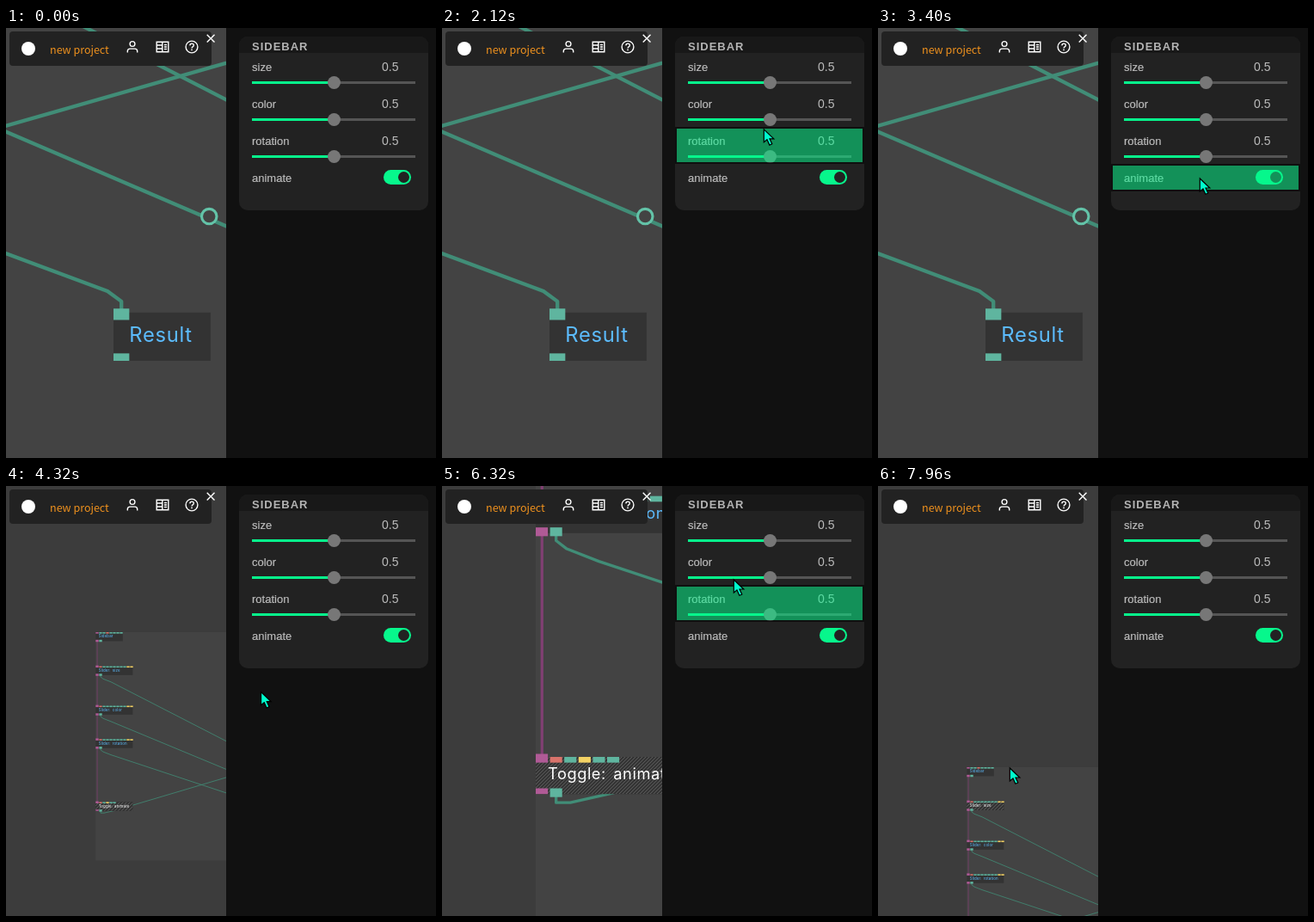
These frames come from a looping animation (500 by 500 pixels, 8 s). An HTML page with a canvas:

```html
<!DOCTYPE html>
<html lang="en">
<head>
<meta charset="utf-8">
<title>Patch editor with sidebar</title>
<style>
  html, body { margin: 0; width: 100%; height: 100%; overflow: hidden; background: #111; }
  #stage { position: relative; width: 500px; height: 500px; overflow: hidden; background: #111; }
  #stage * { position: absolute; }
  #patch { left: 0; top: 0; width: 256px; height: 500px; }
  #bar { left: 4px; top: 4px; width: 235px; height: 40px; border-radius: 4px; background: #222; }
  #icons, #cursor { left: 0; top: 0; overflow: visible; }
  #project { left: 51px; top: 15px; font: 12.5px/20px "Noto Sans CJK JP", "Noto Sans CJK", "Open Sans", sans-serif; color: #f0921e; white-space: nowrap; }
  #panel { left: 271px; top: 10px; width: 220px; height: 202px; border-radius: 10px; background: #222; overflow: hidden; }
  #head { left: 0; top: 0; width: 220px; height: 19px; background: #181818; }
  #head b { left: 15px; top: 4px; font: bold 13px/16px "Liberation Sans", Arial, sans-serif; letter-spacing: 1px; color: #b4b4b4; }
  .row { left: 2px; width: 216px; height: 39px; }
  .row span { left: 13px; top: 7px; font: 13px/15px "Liberation Sans", Arial, sans-serif; color: #bbb; -webkit-text-stroke: .2px; }
  .row .value { left: 164px; top: 6px; font-size: 14px; line-height: 16px; -webkit-text-stroke: 0; }
  .track, .fill { left: 13px; top: 31px; width: 190px; height: 3px; background: #555; }
  .fill { width: 95px; background: #07f78c; }
  .knob { left: 101px; top: 25px; width: 15px; height: 15px; border-radius: 50%; background: #777; }
  .row:last-child { height: 28px; }
  .switch { left: 166px; top: 5px; width: 32px; height: 17px; border-radius: 9px; background: #07f78c; }
  .switch i { right: 2px; top: 2px; width: 13px; height: 13px; border-radius: 50%; background: #222; }
  .row.on::after { content: ""; position: absolute; inset: 0; background: rgba(7, 247, 140, .52); box-shadow: 0 0 0 2px rgba(0, 0, 0, .55); }
</style>
</head>
<body>
<div id="stage">
  <canvas id="patch"></canvas>
  <div id="bar"></div>
  <div id="project">new project</div>
  <svg id="icons" width="256" height="50" fill="none" stroke="#fff" stroke-width="1.4">
    <circle cx="26" cy="24" r="8" fill="#fff" stroke="none"/>
    <circle cx="147" cy="18.5" r="2.9"/>
    <path d="M141.3 28.5v-1.4q0-3 3-3h5.4q3 0 3 3v1.4"/>
    <path d="M175.2 16.2h13.6v11.6h-13.6zM181.8 16v12M184 19.5h3M184 22h3M184 24.5h3M175 20h6.5M175 24h6.5"/>
    <circle cx="216" cy="22" r="6.9"/>
    <path d="M213.8 20.4q.1-2.3 2.3-2.3 2.2 0 2.2 2 0 1.2-1.2 1.8-1 .6-1 1.5M216 24.6v1.6"/>
    <path d="M233.7 7.7l8.8 8.8m0-8.8l-8.8 8.8"/>
  </svg>
  <div id="panel"><div id="head"><b>SIDEBAR</b></div></div>
  <svg id="cursor" width="14" height="21">
    <path d="M.3 0V15L4 12 6.800 18.300 9.800 17 7 11H11.800Z" fill="#0fc" stroke="#000" stroke-width="1.200"/>
  </svg>
</div>
<script>
const LOOP = 8000, APPEAR = 680, HOVER = 1720, CLICK_TOGGLE = 3800, CLICK_SIZE = 7200;
const HOVER_LAG = 40;
const COLORS = { t: '#5fb59f', p: '#b05a96', r: '#d9736b', y: '#f3d264' };
const $ = id => document.getElementById(id);

const panel = $('panel'), cursor = $('cursor');
const sliderUi = '<span class="value">0.5</span><div class="track"></div><div class="fill"></div><div class="knob"></div>';
const switchUi = '<div class="switch"><i></i></div>';
const rows = ['size', 'color', 'rotation', 'animate'].map((name, i) => {
  const row = document.createElement('div');
  row.className = 'row';
  row.style.top = 21 + 43 * i + 'px';
  row.innerHTML = `<span>${name}</span>` + (name === 'animate' ? switchUi : sliderUi);
  panel.append(row);
  return row;
});

// Moves: start, end, then the values reached
const pointerMoves = [
  [680, 1280, 374, 157], [1920, 2320, 374, 79], [2480, 2640, 380, 55], [2835, 3300, 374, 175],
  [3800, 4320, 296, 239], [4320, 4560, 354, 399], [4640, 5400, 144, 324],
  [5520, 6320, 339, 109], [6360, 6600, 346, 55], [7240, 7960, 153, 328]
];
const viewMoves = [
  [3800, 4200, 1, 104.3, 170], [4900, 5400, 4.03, 109, -480.5],
  [5520, 5800, 4.15, 109, -504.2], [7200, 7600, 1, 103.3, 327]
];
const linear = u => u;
const smooth = u => u * u * (3 - 2 * u);

function follow(start, moves, t, ease) {
  return moves.reduce((from, [t0, t1, ...to]) => {
    const u = ease(Math.min(1, Math.max(0, (t - t0) / (t1 - t0))));
    return from.map((v, i) => v + (to[i] - v) * u);
  }, start);
}
const pointerAt = t => follow([464, 459], pointerMoves, t, linear);
const viewAt = t => follow([5.4, -901, -774], viewMoves, t, smooth);

// The highlight trails the pointer slightly
function hoveredRow(t) {
  if (t < HOVER || t >= CLICK_SIZE || (t >= CLICK_TOGGLE && t < 5520)) return -1;
  const [x, y] = pointerAt(t - HOVER_LAG);
  return x > 271 && y < 190 ? Math.floor((y - 29) / 43) : -1;
}

// Nodes and cables in patch units
const HEIGHT = 10.4, PITCH = 4;
const node = (name, y, top, more) => ({ name, x: 0, y, w: 43, top, bottom: 'pt', links: 'pt', lift: .85, ...more });
const sliderPorts = 'pr' + 't'.repeat(7) + 'yy';
const nodes = [
  node('Sidebar', 0, 'pttrtttt', { w: 31.5, lift: 0 }),
  node('Slider: size', 39.5, sliderPorts),
  node('Slider: color', 85.5, sliderPorts),
  node('Slider: rotation', 124.3, sliderPorts),
  node('Toggle: animate', 197.4, 'prtytt', { links: 't' }),
  node('Result', 204.6, 't', { x: 190, w: 20.9, bottom: 't', links: '' })
];
const [, size, color, rotation, toggle] = nodes;
const leave = ({ y }) => [[5.7, y + 10], [5.7, y + 12.5], [8.7, y + 14.8], [17.7, y + 18.3]];
const cables = [
  [...leave(size), [184.1, 143.3], [240, 172]],
  [...leave(color), [166.9, 165.7], [240, 197]],
  [...leave(rotation), [166.9, 191.9], [188.7, 200], [191.7, 202.2], [191.7, 205]],
  [[5.7, 207], [5.7, 210.2], [9.7, 210.2], [21.7, 207.5], [166.9, 164.4], [240, 143.5]]
];

const canvas = $('patch'), ctx = canvas.getContext('2d');
const dpr = window.devicePixelRatio || 1;
canvas.width = 256 * dpr;
canvas.height = 500 * dpr;

function box(color, x, y, w, h) {
  ctx.fillStyle = color;
  ctx.fillRect(x, y, w, h);
}

function line(points, color, width) {
  ctx.beginPath();
  points.forEach(p => ctx.lineTo(...p));
  ctx.strokeStyle = color;
  ctx.lineWidth = width;
  ctx.stroke();
}

// Diagonal hatching keeps its spacing on screen at any zoom, and brightens under the pointer
function hatch({ x, y, w }, [s, ox, oy], [px, py]) {
  const left = ox + x * s, top = oy + y * s, width = w * s, height = HEIGHT * s;
  const hot = px > left && px < left + width && py > top && py < top + height;
  ctx.save();
  ctx.setTransform(dpr, 0, 0, dpr, 0, 0);
  ctx.beginPath();
  ctx.rect(left, top, width, height);
  ctx.clip();
  box(hot ? '#484848' : '#353535', left, top, width, height);
  const first = Math.floor((left + top) / 4) * 4;
  for (let i = first; i < left + top + width + height; i += 4)
    line([[i - top, top], [i - top - height, top + height]], hot ? '#787878' : '#5c5c5c', 1);
  ctx.restore();
}

function drawNode(n, selected, view, pointer) {
  const { x, y, w, lift } = n;
  box('#333', x, y, w, HEIGHT);
  if (selected) hatch(n, view, pointer);
  [...n.top].forEach((c, i) => {
    const extra = i ? 0 : lift;
    box(COLORS[c], x + PITCH * i, y - extra, 3.4, 1.6 + extra);
  });
  [...n.bottom].forEach((c, i) => {
    const extra = n.links.includes(c) ? .85 : 0;
    box(COLORS[c], x + PITCH * i, y + HEIGHT - 1.6, 3.4, 1.6 + extra);
  });
  ctx.fillStyle = selected ? '#fff' : '#5cbcff';
  ctx.font = '4.4px Inter, "Noto Sans", sans-serif';
  ctx.letterSpacing = '0.13px';
  ctx.wordSpacing = '0.7px';
  ctx.fillText(n.name, x + 3.4, y + 6.35);
}

function drawPatch(t, pointer) {
  const view = viewAt(t), [s, ox, oy] = view;
  const selected = t < CLICK_TOGGLE ? null : t < CLICK_SIZE ? toggle : size;
  ctx.setTransform(dpr, 0, 0, dpr, 0, 0);
  box('#3c3c3c', 0, 0, 256, 500);
  ctx.setTransform(s * dpr, 0, 0, s * dpr, ox * dpr, oy * dpr);
  box('#434343', 0, 0, 260, 265.5);
  ctx.lineJoin = 'round';
  line([[1.75, 10], [1.75, 198]], '#803f72', .78);
  cables.forEach(c => line(c, '#418d77', .8));
  ctx.beginPath();
  ctx.arc(210.6, 183.9, 1.62, 0, 7);
  ctx.fillStyle = '#434343';
  ctx.fill();
  ctx.strokeStyle = '#63c3a8';
  ctx.lineWidth = .58;
  ctx.stroke();
  nodes.forEach(n => drawNode(n, n === selected, view, pointer));
}

function draw() {
  const t = performance.now() % LOOP;
  const pointer = pointerAt(t), hover = hoveredRow(t);
  drawPatch(t, pointer);
  rows.forEach((row, i) => row.classList.toggle('on', i === hover));
  cursor.style.visibility = t < APPEAR ? 'hidden' : 'visible';
  cursor.style.transform = `translate(${pointer[0]}px, ${pointer[1]}px)`;
  requestAnimationFrame(draw);
}
draw();
</script>
</body>
</html>
```
